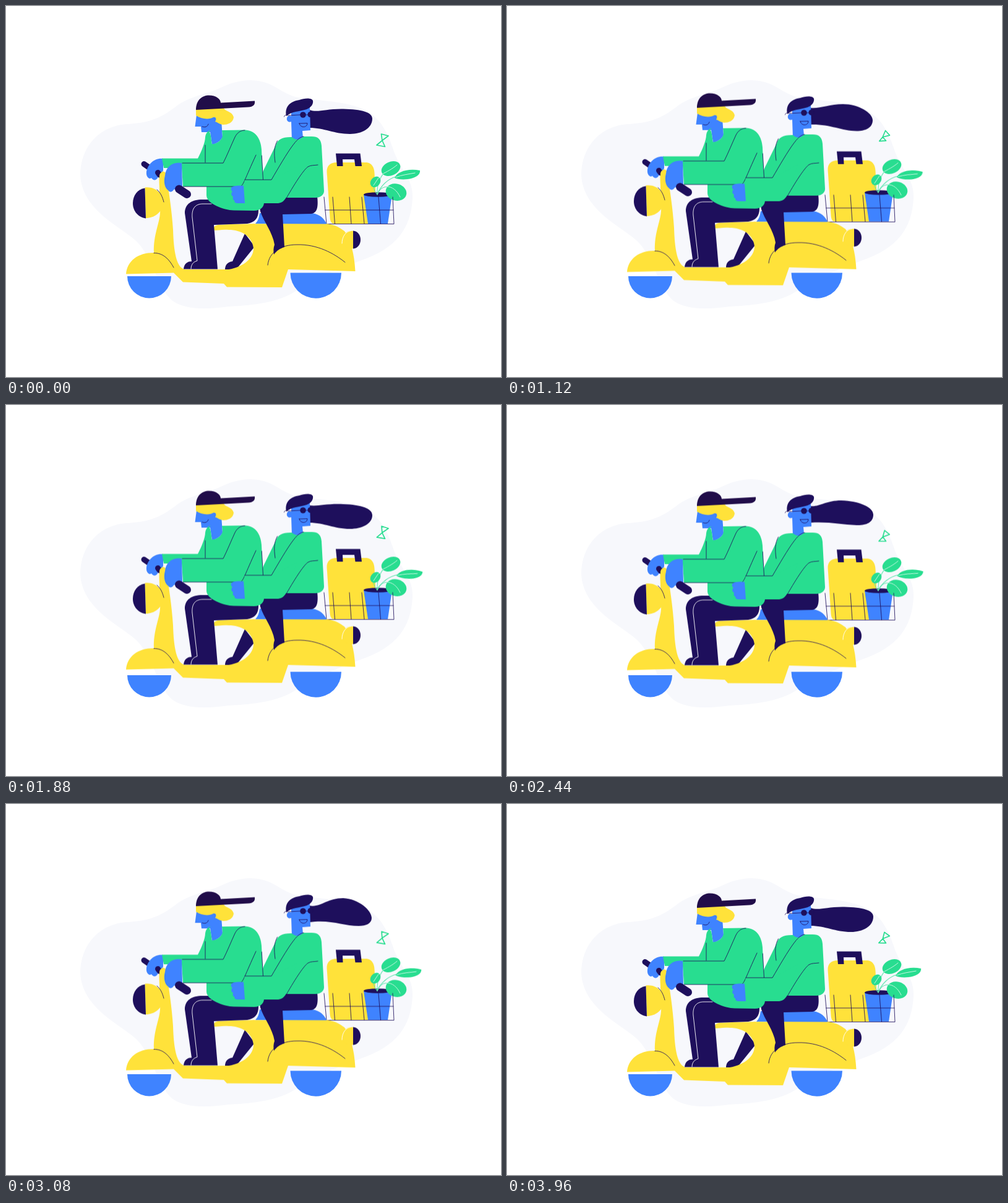
Write an HTML page that moves like this. It is 800x600 px and loops after 4000 ms.

```html
<!DOCTYPE html>
<html lang="en">
<head>
<meta charset="utf-8">
<title>Scooter ride</title>
<style>
html, body { margin: 0; width: 100%; height: 100%; overflow: hidden; background: #fff; }
svg { display: block; width: 100vw; height: 100vh; }
.navy { fill: #1e0f5c; }
.cap { fill: #210d49; }
.blue { fill: #3f83ff; }
.yellow { fill: #ffe23a; }
.green { fill: #28dd90; }
.line { fill: none; stroke: #1e0f5c; stroke-width: .85; stroke-linecap: round; stroke-linejoin: round; }
.grip { fill: none; stroke: #1e0f5c; stroke-linecap: round; }
.pale { fill: none; stroke: #fff; stroke-width: .9; stroke-linecap: round; }
.stem { fill: none; stroke: #5fe5ae; stroke-width: 1.1; stroke-linecap: round; }
.vein { fill: none; stroke: #c9f7e3; stroke-width: 1; stroke-linecap: round; }

#ride { animation: bob 2s linear infinite alternate; }
@keyframes bob { to { transform: translateY(-6px); } }

#leaf { transform-origin: 600px 303px; animation: sway 2s linear infinite alternate; }
@keyframes sway { to { transform: rotate(8deg); } }

#hair { animation: stream 4s linear infinite; }
@keyframes stream {
  0%, 99%, 100% { d: path("M490 168C505 173 515 166 545 166.5C575 167 592 172 592 182C592 198 575 207 556 207C530 207 515 197 490 197Z"); }
  12% { d: path("M490 167C510 170 518 154.5 545 154.5C570 155 591 172 591 184C591 194 575 197 560 196.5C535 195 520 189 490 193Z"); }
  28% { d: path("M490 168C505 170 520 162 543 162C568 162 591 176 591 188C591 200 580 205.5 565 205.5C540 205 522 194 490 195Z"); }
  47% { d: path("M490 168C505 170 515 165 545 166C575 167 592 173 592 184C592 198 575 206 556 206C530 206 515 196 490 196Z"); }
  61% { d: path("M490 168C505 170 515 159 540 159C570 160 592 170 592 182C592 195 580 199.5 565 199C540 198 520 193 490 195Z"); }
  77% { d: path("M490 167C508 171 518 155 545 155C570 156 591 175 591 187C591 196 582 200 570 200C545 200 525 189 490 194Z"); }
}

#butterfly { animation: flit 4s linear infinite; }
@keyframes flit {
  0%, 99%, 100% { transform: none; }
  12% { transform: translateY(-2.3px); }
  28% { transform: translateY(-6px); }
  47% { transform: translateY(-11px); }
  61% { transform: translateY(-4.5px); }
  77% { transform: translateY(-.7px); }
}
#wings { fill: none; stroke: #28dd90; stroke-width: 1.7; stroke-linejoin: round; animation: flap calc(4s / 60) ease-in-out infinite alternate; }
@keyframes flap {
  from { d: path("M606.5 207L618 210L608 217.5L612.5 227.5L599 225L608 217.5Z"); }
  to { d: path("M612 207.5L618.5 215.5L607 218L612.5 223.5L602 224.5L607 218Z"); }
}
</style>
</head>
<body>
<svg viewBox="0 0 800 600">
  <path fill="#f7f8fc" d="M120 272C121 228 150 194 195 191C235 189 252 180 278 160C298 146 328 141 345 133C362 125 378 120 395 120C432 121 440 139 468 147C500 154 548 152 580 168C608 183 618 208 628 238C640 268 658 280 657 310C655 360 630 392 575 411C530 428 500 440 470 460C440 480 400 484 360 486C325 491 290 492 268 476C245 455 240 415 215 385C195 360 122 335 120 272Z"/>

  <!-- wheels -->
  <path class="blue" d="M196 437H267A35.5 35.5 0 0 1 196 437Z"/>
  <path class="blue" d="M459.5 431.5H542A41.25 41.25 0 0 1 459.5 431.5Z"/>

  <g id="butterfly"><path id="wings" d="M606.5 207L618 210L608 217.5L612.5 227.5L599 225L608 217.5Z"/></g>

  <g id="ride">
    <!-- luggage -->
    <path class="yellow" d="M534 253H583C592 254 595 262 595.5 270L600 352H531C526 352 524 349 523.5 342L518.5 268C518 258 525 253 534 253Z"/>
    <path class="navy" d="M533 238.5H572.5L575 259H564.5L563 248H544L544.5 259H535Z"/>

    <!-- plant -->
    <path class="blue" d="M578 305H624L617 352H585Z"/>
    <ellipse class="navy" cx="601" cy="305" rx="23" ry="3.8"/>
    <path class="stem" d="M600 305C599 288 606 272 616 266M600 305C594 297 592 292 597 284M600 305C604 294 613 290 622 294"/>
    <g class="green">
      <ellipse cx="622" cy="263" rx="16" ry="11" transform="rotate(-24 622 263)"/>
      <ellipse cx="597" cy="284.5" rx="9.5" ry="7.5" transform="rotate(-50 597 284.5)"/>
      <ellipse cx="630.5" cy="301" rx="17" ry="13.5" transform="rotate(15 630 301)"/>
    </g>
    <path class="vein" d="M608 272C615 268 624 264 632 257M594 290L602 278M615 292C624 292 632 298 637 309"/>
    <g id="leaf">
      <path class="stem" d="M600 305C605 291 617 280 630 276"/>
      <path class="green" d="M628 278C632 268 650 262 669 266C670 274 660 279 649 280C640 281 632 280 628 278Z"/>
      <path class="vein" d="M630 277C640 273 650 272 661 270"/>
    </g>
    <path class="line" d="M514 309L518 352.5H627L625 309M528 309L531.5 352M555 309L558 352M575 309L579 352M602 309L605.5 352M515.5 330H626"/>

    <!-- passenger -->
    <path id="hair" class="navy" d="M490 168C505 173 515 166 545 166.5C575 167 592 172 592 182C592 198 575 207 556 207C530 207 515 197 490 197Z"/>
    <path class="blue" d="M461 172L491 163L492 201L479 202L480 213C475 217 468 217 462 216L461 187C456 189 453 185 454 181C455 177 458 177 461 178Z"/>
    <path class="navy" d="M453 178C450 162 460 154 474 152C482 149 494 148 496 153C497 159 493 164 486 167C474 171 462 170 453 178Z"/>
    <path class="line" d="M449.5 179C450 176 453 176 456 177L475 176H491C495 172 497 173 497 176"/>
    <circle class="navy" cx="480" cy="176" r="4.8"/>
    <ellipse class="navy" cx="491.5" cy="175.5" rx="4" ry="4.6"/>
    <path class="line" d="M474 190L487 189.5C487 197 476 198 474 190Z"/>

    <!-- far leg -->
    <path class="navy" d="M386 368L366 413C358 414 354 419 354 426H372L402 389Z"/>

    <!-- scooter -->
    <path class="yellow" d="M194 433.5C196 412 213 399 239 399C238 370 248 352 249 335C251 310 246 290 248 272C250 266 257 266 259 272C263 300 268 330 270 362C271 395 275 426 291 426H360C384 422 400 408 400 392C398 372 380 362 360 362C350 361 342 363 337 363C334 358 337 355 343 354C380 352 410 352 518 352C534 354 541 360 547 364C557 378 563 400 564.5 429L456 426L446 455L357 454.5L352 449L286 446.5L271 431.5Z"/>
    <path class="yellow" d="M224.5 293.5C240 291 254 303 255 318C252 334 240 343 226 343Z"/>
    <path class="navy" d="M224.5 294.5L226 343.5C214 342 205 332 205 319C205 306 213 296 224.5 294.5Z"/>
    <circle class="yellow" cx="558" cy="378" r="14.5"/>
    <path class="navy" d="M561 363.5C568 364 573 370 573 378C573 386 568 392 561 392.5Z"/>
    <path class="pale" d="M543 384C543 373 549 364 558 363.5"/>
    <path class="line" d="M239 399.5C254 399 264 410 271 423"/>
    <path class="blue" d="M403 352C408 347 409 341 410 335H495C508 337 514 344 518.5 352.5Z"/>
    <path class="navy" d="M408 308L411 332C416 348 431 366 434 386C432 391 432 397 433 402C437 396 443 392 450 390L447 337L493 336C503 335 505 325 503 308Z"/>
    <path class="line" d="M423 419C425 398 444 386 470 386C503 385 530 400 548 414.5"/>

    <!-- passenger top -->
    <path class="green" d="M460 212C446 212 439 216 436 225L416 266L410 281V310H500C509 310 514 305 514 299L510 226C509 215 504 211 494 211H480C474 218 468 217 462 212Z"/>
    <path class="line" d="M438.5 218C433 228 433 238 435 253"/>

    <!-- rider -->
    <path class="navy" d="M289 335C289 320 300 313 318 313H408V331C408 343 402 350 390 352L336 354L342 425.5H287C288 416 294 413 300 413Z"/>
    <path class="pale" d="M332 320H318C304 320 300 330 301 342L309 412C302 414 299 419 299 425"/>
    <path class="blue" d="M308 176L305.5 195H315L316 204H330L333 224C341 223 348 217 350 212L348 185L336 172Z"/>
    <path class="yellow" d="M307 165H352C354 171 366 170 368 180C367 189 358 192 351 192C344 191 342 188 338 187C341 183 339 179 335 180C329 184 315 183 307 177Z"/>
    <path class="cap" d="M307 168C307 152 317 144.5 328 144.5C340 144.5 347 151 347 156.5L402 153.5C403 160 399 163 392 163.5Z"/>
    <path class="line" d="M317 195C322 197 326 195 327 191"/>

    <!-- far hand -->
    <path class="grip" stroke-width="9" d="M223 255.5L233 262.5"/>
    <path class="blue" d="M254 247C240 245 229 256 227 268C226 276 231 281 235 278C238 283 243 282 245 278L254 266Z"/>
    <path class="grip" stroke-width="9" d="M245.5 269.5L248 273"/>

    <path class="yellow" d="M248 300V274C249 268 255 267 259 271L263 300Z"/>
    <path class="line" d="M244 297C250 302 253 309 255 317"/>
    <path class="green" d="M331 201L328 203L330 206C332 214 332 220 333 223.5C341 223 349 217 350 210L349 201L385 200.5C402 200 412 214 413 232L417 318C417 325 411 331 401 331L368 330.5C352 330 324 320 324 306V292H286L284 262H255L252 246.5H310C316 235 322 220 322 212C323 205 327 201 331 201Z"/>
    <path class="line" d="M322 225V253M285 254H351C358 240 364 225 370 212C374 204 380 201 386 201M286 292H379C384 289 386 280 404 241M413.3 242L415.5 281"/>

    <!-- near hand -->
    <path class="blue" d="M284 254C270 251 258 260 257 274C254 285 257 295 262 298C265 302 269 301 271 297L285 292Z"/>
    <path class="grip" stroke-width="13" d="M279.5 296L292.5 304.5"/>

    <!-- passenger arm -->
    <path class="blue" d="M387 291C377 290 367 290 364 294C363 297 364 299 366 300C363 303 364 307 367 308C366 312 367 314 369 314C369 318 371 319 375 319H387Z"/>
    <path class="green" d="M386 281H429L470 260L452 311C448 317 444 319 438 319H386L384 291Z"/>
    <path class="line" d="M386 281H429C440 262 454 238 463 226C469 218 474 212 481 211M453 311C469 283 482 264 488 260C493 257 498 258 504 257"/>
  </g>
</svg>
</body>
</html>
```
